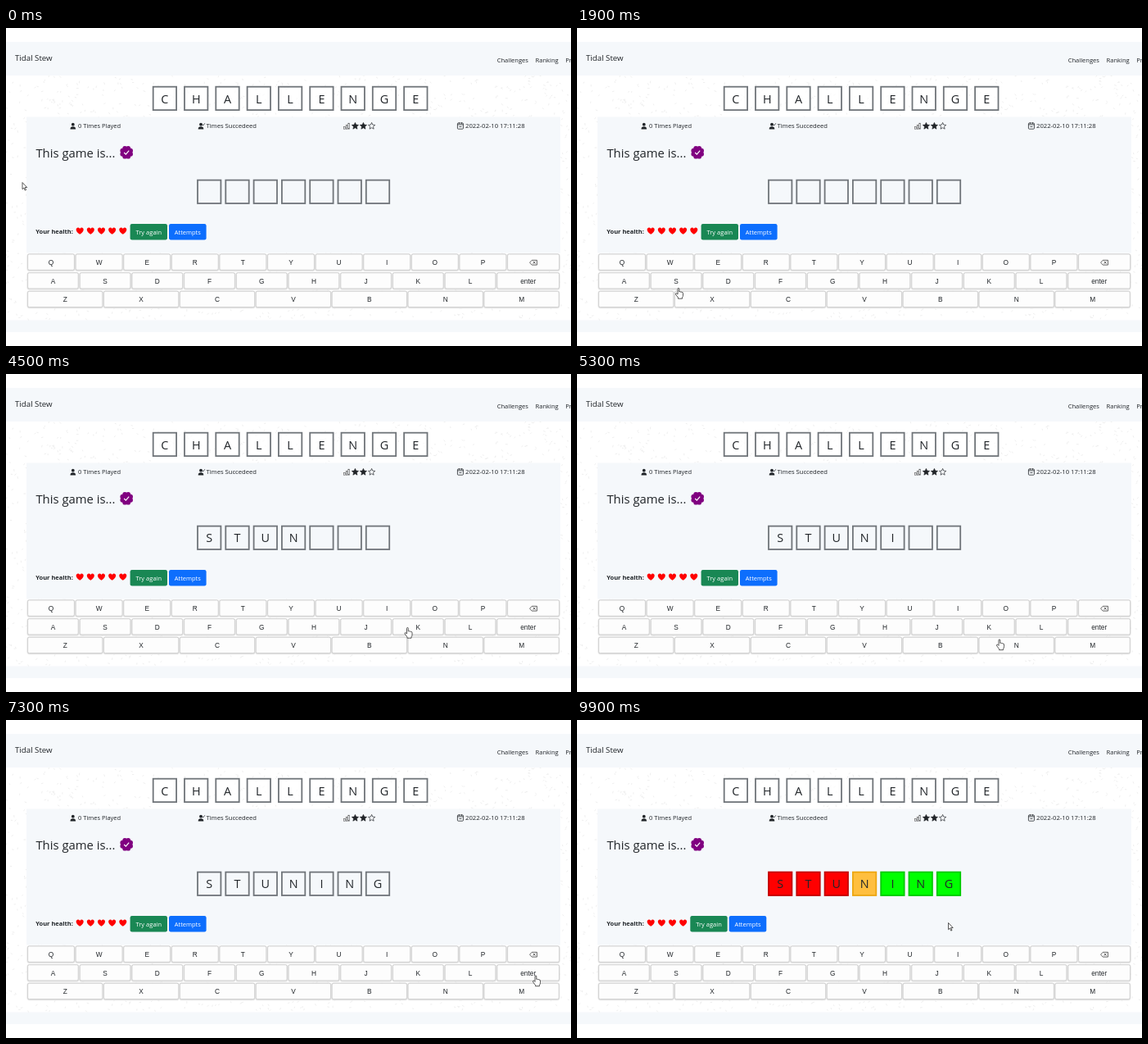
An HTML page for the animation above (10 s loop, 690x388 px).

```html
<!DOCTYPE html>
<html lang="en">
<head>
<meta charset="utf-8">
<title>Word challenge</title>
<style>
  html, body { margin: 0; width: 100%; height: 100%; overflow: hidden; background: #fff; }
  svg { display: block; width: 690px; height: 388px; font-family: "Open Sans", "Noto Sans", sans-serif; fill: #212529; }
  .key { font-family: "Liberation Sans", Arial, sans-serif; font-size: 8.3px; }
  .mid { text-anchor: middle; }
</style>
</head>
<body>
<svg id="stage" viewBox="0 0 690 388"></svg>
<script>
const LOOP = 10000;
const stage = document.getElementById('stage');

function el(tag, attrs, parent = stage) {
  const node = document.createElementNS('http://www.w3.org/2000/svg', tag);
  for (const name in attrs) node.setAttribute(name, attrs[name]);
  return parent.appendChild(node);
}
const rect = (x, y, width, height, fill, more, parent) =>
  el('rect', { x, y, width, height, fill, ...more }, parent);
const path = (d, more, parent) => el('path', { d, ...more }, parent);
function text(str, x, y, size, more, parent) {
  const node = el('text', { x, y, 'font-size': size, ...more }, parent);
  node.textContent = str;
  return node;
}

// Faint confetti behind the page
let seed = 7;
const rnd = () => (seed = (seed * 16807) % 2147483647) / 2147483647;
function confetti() {
  let d = '';
  for (let i = 0; i < 1900; i++) {
    const x = rnd() * 690, y = 58 + rnd() * 298, a = rnd() * Math.PI, r = 1 + rnd();
    d += `M${x.toFixed(1)} ${y.toFixed(1)}l${(r * Math.cos(a)).toFixed(1)} ${(r * Math.sin(a)).toFixed(1)}`;
  }
  path(d, { stroke: '#efefef', 'stroke-width': 1, 'stroke-linecap': 'round' });
}

function tile(x, y, letter) {
  const box = rect(x + 1, y + 1, 28.4, 28.4, 'none', { stroke: '#70757a', 'stroke-width': 1.8 });
  const label = text(letter, x + 15.2, y + 20.8, 14.4, { class: 'mid' });
  return { box, label };
}

function star(cx, cy, fill) {
  const points = Array.from({ length: 10 }, (_, i) => {
    const r = i % 2 ? 2 : 4.3, a = i * Math.PI / 5 - Math.PI / 2;
    return `${cx + r * Math.cos(a)},${cy + r * Math.sin(a)}`;
  }).join(' ');
  el('polygon', { points, fill, stroke: '#212529', 'stroke-width': 0.7, 'stroke-linejoin': 'round' });
}

function person(x) {
  el('circle', { cx: x, cy: 117.7, r: 1.9 });
  path(`M${x - 3.3} 123.4q0-3.2 3.3-3.2t3.3 3.2z`);
}

function button(x, w, label, fill) {
  rect(x, 239, w, 19.4, fill, { rx: 2.2 }, buttons);
  text(label, x + w / 2, 251.7, 7.5, { class: 'mid', fill: '#fff' }, buttons);
}

const keys = {};
function key(name, x, y, w) {
  rect(x, y + 0.4, w, 19.4, 'none', { rx: 2, stroke: '#e2e2e2', 'stroke-width': 2.2 });
  keys[name] = rect(x, y, w, 19.2, '#fdfdfd', { rx: 1.8, stroke: '#c6c6c6', 'stroke-width': 0.7 });
  const cx = x + w / 2, cy = y + 9.6;
  if (name === 'back') {
    path(`M${cx - 4.5} ${cy + 0.6}l2.6-2.9h6.2v5.8h-6.2zM${cx - 0.5} ${cy - 0.9}l3 3m0-3l-3 3`,
      { fill: 'none', stroke: '#333', 'stroke-width': 0.75 });
  } else {
    text(name, cx, y + 12.9, 8.3, { class: 'key mid' });
  }
}
function row(names, y, w, pitch, lastW = w) {
  names.forEach((n, i) => key(n, 26.6 + i * pitch, y, i === names.length - 1 ? lastW : w));
}

// Page
confetti();
rect(0, 17, 690, 41, '#f5f8fb');
rect(0, 356.5, 690, 14.5, '#f5f8fb');
rect(25, 108.5, 652, 166, '#f5f8fb');
text('Tidal Stew', 11, 40.4, 9.7);
text('Challenges', 599.7, 41.6, 7.55);
text('Ranking', 646.6, 41.6, 7.55);
text('Profile', 683.2, 41.6, 7.55);

[...'CHALLENGE'].forEach((c, i) => {
  rect(179 + i * 38.3, 71, 30, 30, '#fff', { opacity: 0.7 });
  tile(178.7 + i * 38.3, 70.7, c);
});

// Stats
person(81.8);
text('0 Times Played', 88, 122.4, 7.5);
person(238);
path('M239.4 117.6l1.3 1.4 2.1-2.7', { fill: 'none', stroke: '#212529', 'stroke-width': 0.8 });
text('Times Succedeed', 244.4, 122.4, 7.65);
[0, 1, 2].forEach(i => rect(412.6 + i * 2.6, 120.6 - i * 2.2, 1.7, 2.6 + i * 2.2, 'none',
  { stroke: '#555', 'stroke-width': 0.6 }));
star(426.4, 119.7, '#212529');
star(436.4, 119.7, '#212529');
star(446.6, 119.7, 'none');
rect(551.4, 116, 7, 7.2, 'none', { rx: 0.8, stroke: '#212529', 'stroke-width': 0.8 });
path('M551.4 117.9h7M553.3 115.2v1.6M556.5 115.2v1.6M553.4 120.4h3', { stroke: '#212529', 'stroke-width': 0.8 });
text('2022-02-10 17:11:28', 561, 122.4, 7.7);

// Question
text('This game is...', 36.4, 157.8, 14.85);
for (let i = 0; i < 8; i++) {
  const a = i * Math.PI / 4 + Math.PI / 8;
  el('circle', { cx: 147.2 + 5.3 * Math.cos(a), cy: 151.8 + 5.3 * Math.sin(a), r: 2.9, fill: '#800080' });
}
el('circle', { cx: 147.2, cy: 151.8, r: 6.3, fill: '#800080' });
path('M144.2 152l2.1 2.1 3.9-4.4', { fill: 'none', stroke: '#fff', 'stroke-width': 1.2 });

const COLORS = [['#f00', '#c40000'], ['#ffbf3f', '#eda711'], ['#0f0', '#00ca00']];
const RESULT = [0, 0, 0, 1, 2, 2, 2];
const answer = [...'STUNING'].map((c, i) => tile(233 + i * 34.3, 184.6, c));

// Health
text('Your health:', 36.2, 250.6, 7.5, { 'font-weight': 700 });
const hearts = [0, 1, 2, 3, 4].map(i =>
  path(`M${90.2 + i * 13.15} 251.8c-7-4.3-4.4-8.6-1.9-8.2q1.4.2 1.9 1.5q.5-1.3 1.9-1.5c2.5-.4 5.1 3.9-1.9 8.2z`, { fill: '#f00' }));
const buttons = el('g', {});
button(151.6, 45.4, 'Try again', '#198754');
button(199, 45.6, 'Attempts', '#0d6efd');

// Keyboard
row([...'QWERTYUIOP', 'back'], 276, 56.8, 58.6, 63);
row([...'ASDFGHJKL', 'enter'], 298.7, 61.6, 63.7, 75.6);
row([...'ZXCVBNM'], 321.3, 91.2, 92.9);

// Pointers
const look = { fill: '#fff', stroke: '#222', 'stroke-width': 0.75, 'stroke-linejoin': 'round' };
const arrow = path('M0 0V8.2L1.9 6.5 3.2 9.6 4.5 9 3.2 6H5.7Z', look);
const hand = path('M-1 1q0-1.1.9-1.1t.9 1.1v3.4q.9-.7 1.6.2 1-.5 1.6.4 1.5-.3 1.5 1.2v2.4q0 1.6-1 2.7v1.4H-.5v-1.2L-3.4 7.6q-.5-1.3.6-1.5.8 0 1.8 1.3z', look);

// Time, pointer tip, hovered key
const MOVES = [
  [0, 20, 188.5], [100, 24, 190], [200, 34, 190], [300, 48, 184], [400, 62, 175], [500, 74, 170],
  [900, 110, 176], [1100, 155, 191], [1300, 141, 200],
  [1600, 137, 240], [1800, 126, 300], [1900, 124, 317.5],
  [2200, 124, 317.5], [2400, 222, 302.5], [2700, 276, 286.5, 'T'],
  [3200, 367, 293], [3500, 384, 290, 'U'], [3700, 400, 287, 'U'],
  [4000, 500, 313.5], [4300, 522, 326.5], [4500, 490.5, 309.5],
  [4800, 471, 286.5], [5100, 500, 311], [5300, 516, 324],
  [5600, 563, 326.5, 'N'], [5900, 420, 313], [6100, 327.5, 303.5],
  [6400, 330, 304], [6500, 420, 311], [6700, 560, 318], [6900, 637, 320.5],
  [7200, 646, 316], [7300, 647, 312], [7500, 644, 309], [7700, 640, 307],
  [7900, 635, 306], [8000, 632, 305.5], [8800, 632, 305.5, 'enter'],
  [9100, 632, 305.5], [9600, 567, 287], [9900, 453.5, 247.5]
];
const TYPED = [2200, 2900, 3700, 4300, 5100, 5600, 6400];
const CHECKED = 9100;

function draw(t) {
  const [, x, y, hover] = MOVES.findLast(m => m[0] <= t);
  const onKeys = y > 276 && x > 26;
  const pos = `translate(${x} ${y})`;
  arrow.setAttribute('transform', pos);
  hand.setAttribute('transform', pos);
  arrow.style.display = onKeys ? 'none' : '';
  hand.style.display = onKeys ? '' : 'none';
  for (const n in keys) keys[n].setAttribute('fill', n === hover ? '#ebebeb' : '#fdfdfd');

  const done = t >= CHECKED;
  answer.forEach(({ box, label }, i) => {
    const [fill, stroke] = done ? COLORS[RESULT[i]] : ['none', '#70757a'];
    box.setAttribute('fill', fill);
    box.setAttribute('stroke', stroke);
    label.style.display = t >= TYPED[i] ? '' : 'none';
  });
  hearts[4].style.display = done ? 'none' : '';
  buttons.setAttribute('transform', `translate(${done ? -13.3 : 0} 0)`);
}

const start = performance.now();
function tick() {
  draw((performance.now() - start) % LOOP);
  requestAnimationFrame(tick);
}
tick();
</script>
</body>
</html>
```
